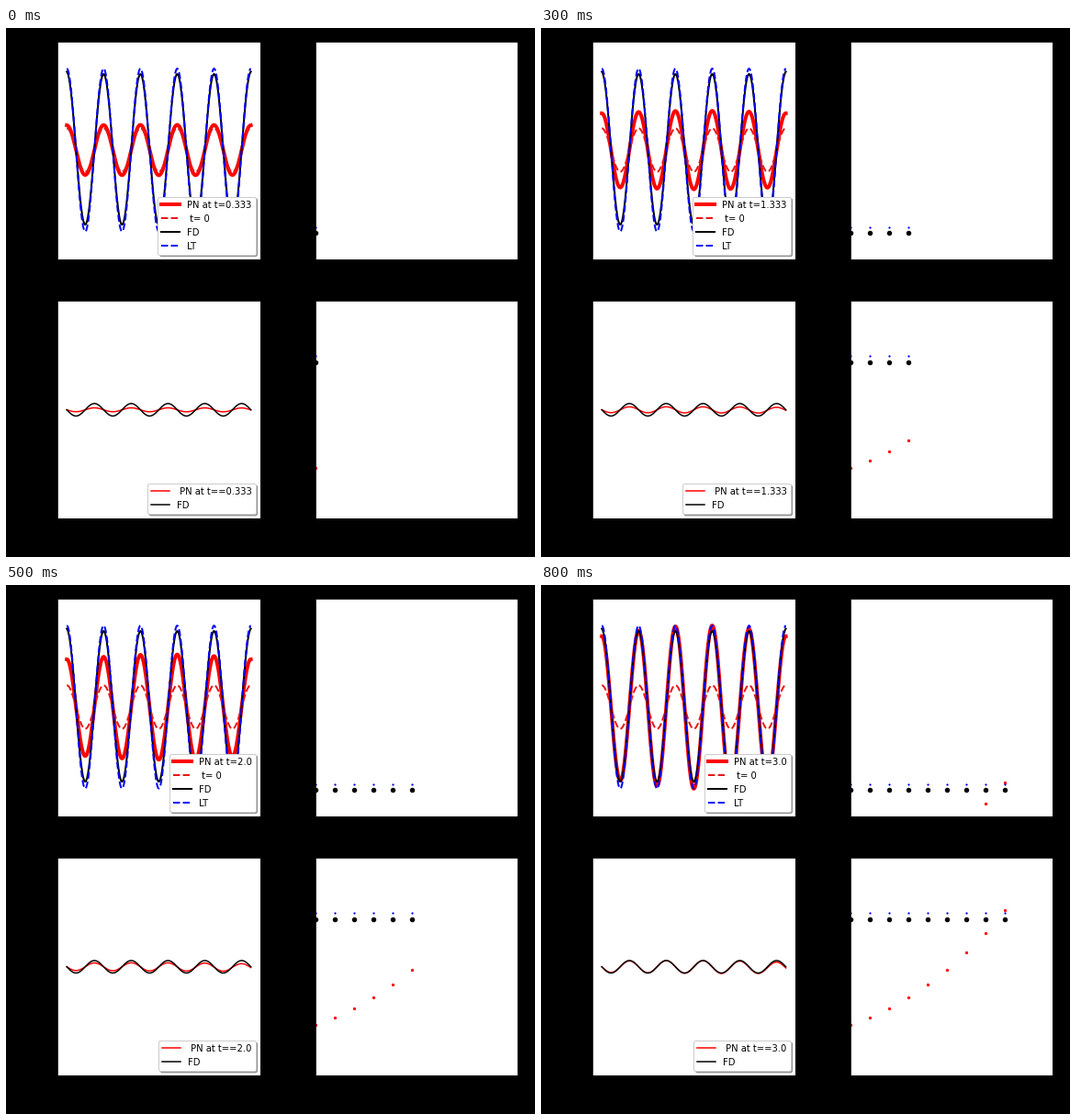
Animation, 576 px wide and 576 px high, one loop 0.9 s. Source, as a matplotlib script:

```python
import numpy as np
import matplotlib.pyplot as plt
from matplotlib.animation import FuncAnimation

SIZE, DPI = 576, 72
FRAMES, STEP_MS = 9, 100

plt.rcParams["font.family"] = "DejaVu Sans"
fig = plt.figure(figsize=(SIZE / DPI, SIZE / DPI), dpi=DPI, facecolor="black")


def panel(left, top, right, bottom):
    """White axes whose data units are stage pixels, y pointing down."""
    box = [left, SIZE - bottom, right - left, bottom - top]
    ax = fig.add_axes([v / SIZE for v in box], facecolor="white")
    ax.set(xlim=(left, right), ylim=(bottom, top), xticks=[], yticks=[])
    return ax


def add_legend(ax):
    return ax.legend(loc="lower right", shadow=True, fontsize=10)


def dots(ax, color, area):
    return ax.scatter([], [], s=area, color=color, linewidths=1)


wave_ax = panel(56.2, 15, 276.6, 251.6)
size_ax = panel(337.1, 15, 557.4, 251.6)
rate_ax = panel(56.2, 297.2, 276.6, 533.9)
growth_ax = panel(337.1, 297.2, 557.4, 533.9)

s = np.linspace(0, 1, 501)
x = 66.2 + 200.4 * s
cosine = np.cos(10 * np.pi * s)
sine = np.sin(10 * np.pi * s)
bulge = np.sin(np.pi * s) * (0.75 + 0.4 * s)
ends = np.exp(-s / 0.015) + np.exp((s - 1) / 0.015)

MID, RATE_MID = 132.9, 415.7
AMP0 = 23.7


def amplitude(t):
    return AMP0 * np.exp(0.393 * t) * (1 + 0.054 * t * bulge)


# Upper left: wave profiles
pn, = wave_ax.plot(x, MID - AMP0 * cosine, "r", lw=4, label="PN at t=0.333")
wave_ax.plot(x, MID - AMP0 * cosine, "--", color="#e81818", lw=2, label=" t= 0")
wave_ax.plot(x, MID - 0.8 - (82 + 2.5 * ends) * cosine, "k", lw=2, label="FD")
wave_ax.plot(x, MID - 88.7 * cosine, "b--", lw=2, label="LT")
wave_legend = add_legend(wave_ax)

# Lower left: rates of change
pn_rate, = rate_ax.plot(x, RATE_MID + 2 * sine, "r", lw=1.5, label=" PN at t==0.333")
rate_ax.plot(x, RATE_MID + 6.8 * sine, "k", lw=1.5, label="FD")
rate_legend = add_legend(rate_ax)

# Right column: one more dot of each kind per step
styles = [("red", 5), ("black", 20), ("blue", 1.5)]
size_dots = [dots(size_ax, *style) for style in styles]
growth_dots = [dots(growth_ax, *style) for style in styles]


def place(groups, px, heights):
    for group, y in zip(groups, heights):
        group.set_offsets(np.column_stack([px, np.broadcast_to(y, px.shape)]))


def update(i):
    t = (i + 1) / 3
    amp = amplitude(t)
    pn.set_ydata(MID - amp * cosine)
    pn_rate.set_ydata(RATE_MID + 0.078 * amp * sine + 0.43 * t * s**3)

    label = str(round(t, 3))
    wave_legend.get_texts()[0].set_text(f"PN at t={label}")
    rate_legend.get_texts()[0].set_text(f" PN at t=={label}")

    k = np.arange(i + 1)
    px = 337.1 + 20.99 * k
    grow = np.exp(0.457 * (k + 1) / 3)
    place(size_dots, px, (376.6 - 41 * grow, 223, 217))
    place(growth_dots, px, (532.06 - 45.3 * grow, 363.5, 356.5))
    return []


anim = FuncAnimation(fig, update, frames=FRAMES, interval=STEP_MS,
                     init_func=lambda: update(0), repeat=True, repeat_delay=0)
plt.show()
```
